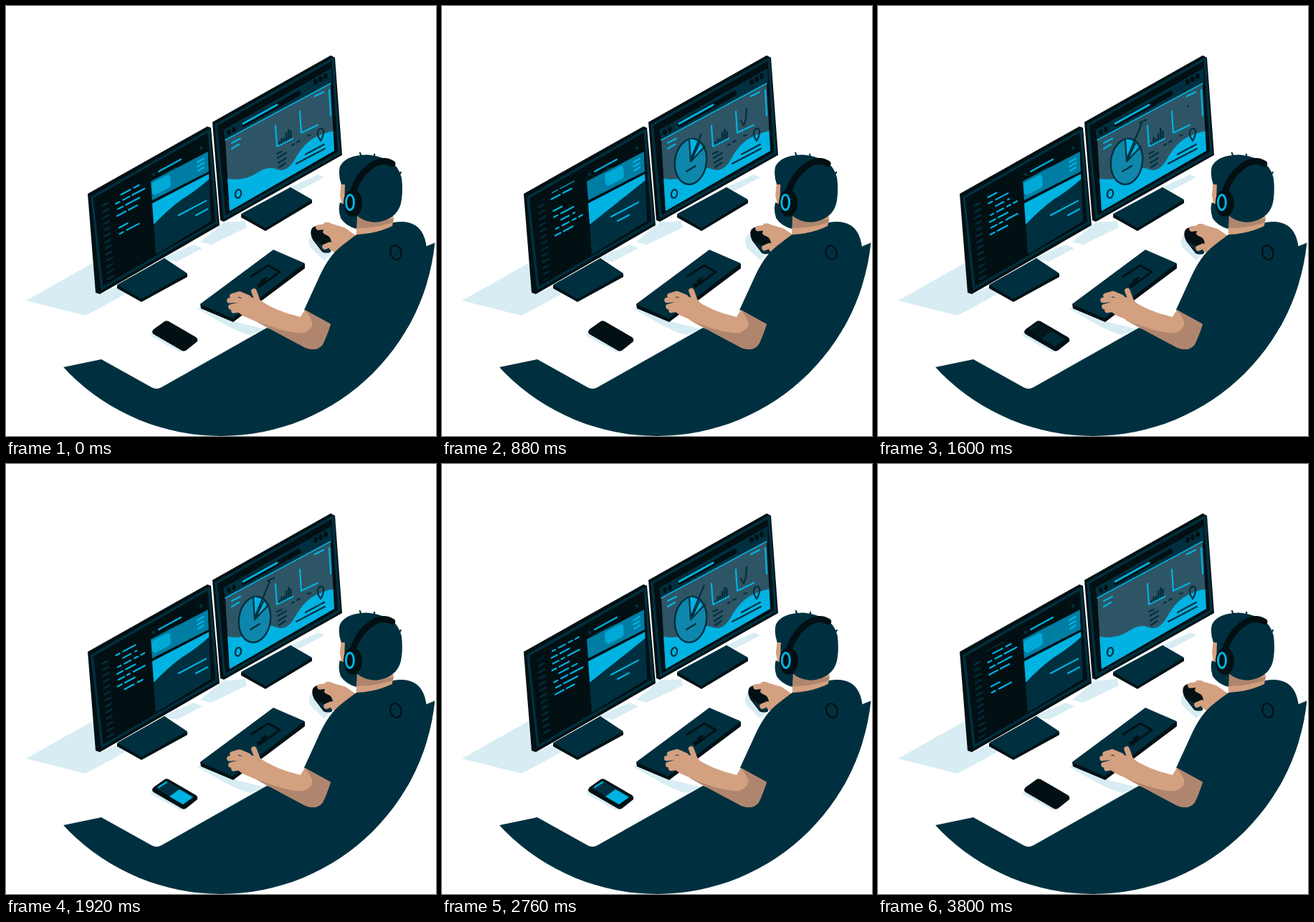
Recreate the animation shown at these times as an HTML page. Size 600 by 600 pixels, loop 3840 ms.

```html
<!DOCTYPE html>
<html lang="en">
<head>
<meta charset="utf-8">
<title>Desk loop</title>
<style>
html, body { margin: 0; width: 100%; height: 100%; overflow: hidden; background: #fff; }
svg { display: block; width: 100vw; height: 100vh; }
.ink { fill: #00303f; }
.black { fill: #021014; }
.blue { fill: #00b3e3; }
.pale { fill: #d7edf3; }
.skin { fill: #d3a080; }
.shade { fill: #af856d; }
.line { fill: none; stroke: #00b3e3; stroke-width: 2.2; stroke-linecap: round; stroke-linejoin: round; }
.dark { stroke: #00303f; }
.jet { stroke: #021014; }
.frame { stroke-width: 3.5; stroke-linejoin: miter; }
.finger { fill: none; stroke: #d3a080; stroke-width: 7.5; stroke-linecap: round; stroke-linejoin: round; }
</style>
</head>
<body>
<svg viewBox="0 0 600 600">
  <defs>
    <clipPath id="disc"><circle cx="300" cy="300" r="300" shape-rendering="crispEdges"/></clipPath>
    <clipPath id="page"><path d="M201 232L281 187L286 300L209 347Z"/></clipPath>
    <clipPath id="codeBox"><path d="M148 263L199 236L207 320L150 350Z"/></clipPath>
    <clipPath id="gutterBox"><path d="M132 274L147 266L155 375L140 385Z"/></clipPath>
    <clipPath id="dash"><path d="M306 187L453 108L458 202L312 286Z"/></clipPath>
  </defs>

  <g class="pale">
    <path d="M28 411L122 358L132 402L156 391L170 400L111 432Z"/>
    <path d="M218 352L262 333L274 338L238 357Z"/>
    <path d="M271 329L304 302L334 300L336 309L286 333Z"/>
    <path d="M394 254L436 235L444 239L404 260Z"/>
    <path d="M266 422L276 420L322 441L362 451L341 459Q326 456 305 444Z"/>
    <path d="M202 456L210 458L250 481L243 483L203 461Z"/>
    <path d="M427 318Q420 328 425 337L444 355L456 342Z"/>
  </g>

  <g id="stands">
    <path class="black" d="M155 390L221 352L253 374V378L189 413L155 394Z"/>
    <path class="ink" d="M155 389L221 352L253 373L189 409Z"/>
    <path class="black" d="M328 291L397 253L427 271V275L362 314L328 295Z"/>
    <path class="ink" d="M328 290L397 253L427 270L362 310Z"/>
  </g>

  <g id="left">
    <path class="black" d="M114 262L281 168L286 170L298 306L131 402L125 400Z"/>
    <path class="line dark frame" d="M120 267L283 174L294 302L134 394Z"/>
    <path class="black" d="M127 269L281 182L289 299L139 385Z"/>
    <g clip-path="url(#page)">
      <path class="ink" d="M200 225H290V350H200Z"/>
      <path class="black" d="M200 232L281 187V200L202 244Z"/>
      <path fill="#007da3" d="M202 245L282 203L283 231L204 271Z"/>
      <path id="slide" fill="#00a8d6" d="M207 245L225 236Q228 235 229 238L230 249Q230 252 227 254L209 263Q205 264 204 260L203 250Q203 247 207 245Z"/>
      <path class="black" d="M203 272L284 230.500V233L204 275Z"/>
      <path id="hill" class="blue"/>
      <g id="pageLines"></g>
    </g>
    <circle class="ink" cx="206" cy="235" r="2.4"/>
    <circle class="ink" cx="272" cy="198" r="2.4"/>
    <path class="line" d="M213 231L244 214"/>
    <path class="line" d="M267 218L276 213M267 224L276 219M268 230L276 225"/>
    <g clip-path="url(#gutterBox)"><g id="gutter"></g></g>
    <g clip-path="url(#codeBox)"><g id="code"></g></g>
  </g>

  <g id="right">
    <path class="black" d="M288 162L453 69L459 72L469 208L304 301L299 299Z"/>
    <path class="line dark frame" d="M293 166L456 74L465 205L305 295Z"/>
    <path class="ink" d="M303 173L454 87L455 106L306 186Z"/>
    <path class="line jet" style="stroke-width:7" d="M332 165L408 122"/>
    <path class="line" style="stroke-width:3" d="M331 164L378 138"/>
    <g class="black">
      <ellipse cx="311" cy="176" rx="2.6" ry="4"/><ellipse cx="318" cy="172.5" rx="2.6" ry="4"/>
      <ellipse cx="432" cy="106" rx="3" ry="4"/><ellipse cx="439" cy="102" rx="3" ry="4"/><ellipse cx="446" cy="98" rx="3" ry="4"/>
    </g>
    <g clip-path="url(#dash)">
      <path fill="#2e5565" d="M300 100H460V290H300Z"/>
      <path class="blue" d="M305 240Q330 246 350 233Q366 222 378 228Q392 233 403 214Q416 190 434 182Q446 176 460 174V290H305Z"/>
    </g>
    <path class="line" style="stroke-width:1.6" d="M306 187L453 108"/>
    <path class="line" d="M315 191L327 185M315 199L325 193M431 126L443 120M451 117L453 153"/>
    <path class="line" d="M376 167L378 196L400 185M410 147L412 177L435 166"/>
    <path class="line dark" d="M378 206L385 203M379 212L391 205M380 219L391 212M381 225L390 219M399 194L402 193M406 190L410 188M421 181L425 180M418 207L444 193M405 220L445 199"/>
    <path class="line dark" d="M439 188Q434 181 435 176Q437 170 441 171Q444 173 443 178Q442 184 439 188Z"/>
    <ellipse class="line dark" cx="324" cy="262" rx="4" ry="6" transform="rotate(12 324 262)"/>
    <g id="bars" class="line dark" style="stroke-width:2.6;stroke-linecap:butt"></g>
    <path id="graph" class="line dark" pathLength="100" d="M417 160L421 167L424 158L425 143Q428 139 429 146Q431 149 433 139"/>
    <g id="pie">
      <ellipse cx="347" cy="217" rx="22" ry="32" transform="rotate(8 347 217)" fill="#0f86ab" stroke="#00303f" stroke-width="2.4"/>
      <path class="blue" d="M347 217L345 186Q355 184 363 197Z"/>
      <path class="line dark" d="M345 186L347 217L367 196M347 217L359 192M341 231L354 223"/>
    </g>
    <path id="callout" class="line dark" pathLength="100" d="M347 214L368 164L365 163L374 159"/>
  </g>

  <g id="keyboard">
    <path class="black" d="M271 416L373 341L417 360V366L317 441L272 422Z"/>
    <path class="ink" d="M271 416L373 340L417 359L316 436Z"/>
    <path class="line jet" style="stroke-width:2.8;stroke-linecap:butt" d="M341 378L366 362L382 371L352 393M356 384L364 379M350 390L364 383"/>
  </g>

  <g id="phone">
    <path class="black" d="M206 451L220 441Q223 438 227 440L265 462Q268 464 267 468L252 480Q248 483 244 480L206 458Q202 455 206 451Z"/>
    <g id="lit">
      <path class="ink" d="M209 452L224 442L262 464L247 475Z"/>
      <path class="blue" d="M228 464L242 454L261 465L247 475Z"/>
      <path class="line" d="M213 451L224 444"/>
    </g>
  </g>

  <g id="mouse">
    <path class="black" d="M428 311Q434 305 442 311L456 326L454 344Q448 347 442 344L429 327Q424 317 428 311Z"/>
    <path class="ink" d="M430 325Q438 336 455 335L453 345Q447 346 442 342Z"/>
    <path class="skin" d="M444 304Q449 301 456 305L473 310L489 321L462 347L452 340L455 331Q455 325 449 320Z"/>
    <path class="finger" d="M454 311L445 309L437 310M455 320L447 316M461 337L453 334L446 337"/>
  </g>

  <g clip-path="url(#disc)">
    <path class="ink" d="M80 504L133 493L203 532Q210 536 217 532L364 449L420 465L453 443L500 420L587 335L604 328V604H80Z"/>
    <g id="torso">
      <path class="ink" d="M416 424L438 376Q451 348 468 335Q478 327 489 319L541 302Q559 299 571 306Q584 314 587 337L587 450L453 444Z"/>
      <ellipse class="line jet" cx="544" cy="344" rx="7.5" ry="10" transform="rotate(-18 544 344)"/>
    </g>
    <path class="skin" d="M352 409Q376 426 411 434L417 424L453 444Q447 462 442 472Q434 483 418 477L345 438Z"/>
    <path class="shade" d="M417 424L453 444Q447 462 442 472Q434 483 418 477L347 439Q398 459 416 456Q430 449 427 440Q423 431 417 424Z"/>
  </g>

  <g id="hand">
    <path class="skin" d="M332 401Q340 406 356 411L362 424L351 441L330 432L321 425Z"/>
    <path class="finger" d="M338 407L326 402L316 405M334 413L321 410L312 411M332 419L322 418L314 420M336 426L324 424L318 425M352 414L346 398"/>
  </g>

  <g id="head">
    <path class="skin" d="M468 244L466 264L470 284L489 297V319Q516 318 539 307L541 295L520 260L478 235Z"/>
    <path class="shade" d="M488 294L515 300L541 297L540 302Q516 310 489 310Z"/>
    <path class="ink" d="M468 249Q463 235 466 224Q473 210 496 208Q512 206 530 214Q547 220 552 240Q554 255 552 270Q549 295 522 301Q505 304 490 293L489 311Q474 307 467 296Q463 284 466 274L472 277L473 249Z"/>
    <path class="line dark" d="M500 211Q495 210 494 205M513 212Q515 210 514 207M544 236Q549 236 551 232"/>
    <path class="line jet" style="stroke-width:9" d="M539 220Q526 212 511 222Q488 238 482 268"/>
    <ellipse class="black" cx="484" cy="275" rx="13" ry="19"/>
    <ellipse class="line" cx="480" cy="274" rx="5.5" ry="10.5" style="stroke-width:3"/>
  </g>
</svg>

<script>
const LOOP = 3840, HALF = LOOP / 2, ROW = 8.5, ROW_MS = 320;
const $ = id => document.getElementById(id);
const clamp = x => Math.max(0, Math.min(1, x));
const smooth = x => (x = clamp(x), x * x * (3 - 2 * x));

function add(parent, cls) {
  const el = document.createElementNS('http://www.w3.org/2000/svg', 'path');
  el.setAttribute('class', cls);
  parent.append(el);
  return el;
}

// Eased value from [time, value] steps.
function track(steps, t) {
  const i = steps.findIndex(s => s[0] > t);
  if (i < 0) return steps[steps.length - 1][1];
  if (!i) return steps[0][1];
  const [a, from] = steps[i - 1], [b, to] = steps[i];
  return from + (to - from) * smooth((t - a) / (b - a));
}

// Each row lists the start and end of its dashes.
const rows = [
  [2, 7, 12, 29], [11, 22, 28, 30], [3, 7, 12, 21, 26, 31, 35, 40],
  [1, 9, 13, 26], [2, 10, 14, 18, 23, 39], [0, 6, 10, 24],
  [9, 22, 27, 34], [1, 6, 11, 20, 24, 41], [3, 10, 14, 33],
  [1, 13, 17, 29], [], [2, 14]
];
const code = rows.map(() => add($('code'), 'line'));
const ticks = Array.from({ length: 15 }, () => add($('gutter'), 'line dark'));
const bars = Array.from({ length: 6 }, () => add($('bars'), ''));
const pageLines = [0, 1].map(() => add($('pageLines'), 'line'));

const slant = (x, y, from, to, k = .53) =>
  `M${x + from} ${y - k * from}L${x + to} ${y - k * to}`;

function drawCode(t) {
  const p = t / ROW_MS;
  rows.forEach((row, k) => {
    const n = k + 12 * Math.floor((p + .9 - k) / 12);
    const v = 46 - ROW * (p - n);
    const typed = clamp((p - n + .9) / .8) * 42;
    let d = '';
    for (let i = 0; i < row.length; i += 2)
      if (typed > row[i]) d += slant(152 + v * .1, 273 + v, row[i], Math.min(row[i + 1], typed));
    code[k].setAttribute('d', v > -14 ? d : '');
  });
  ticks.forEach((el, i) => {
    const v = (i - p % 1) * ROW;
    el.setAttribute('d', slant(134 + v * .08, 279 + v, 0, 8));
  });
}

function drawPage(h) {
  const s = track([[100, 0], [560, 1], [1290, 1], [1480, 0]], h);
  $('slide').setAttribute('transform', `translate(${24 * s} ${-12.5 * s})`);
  $('hill').setAttribute('d', `M203 276L284 234V${241 + 2 * s}Q${265 - s} ${258 + s} 245 ${270 + 4 * s}Q226 ${284 + 5 * s} 206 305Z`);
  const spans = [[241 - 5 * s, 292 + 2 * s, 38], [265 - 20 * s, 292 + 8 * s, 16]];
  spans.forEach(([x, y, w], i) => pageLines[i].setAttribute('d', slant(x, y, 0, w)));
}

function stroke(el, from, to) {
  const len = Math.max(0, to - from);
  el.style.strokeDasharray = `${len} 300`;
  el.style.strokeDashoffset = -from;
  el.style.visibility = len > .5 ? 'visible' : 'hidden';
}

function drawCharts(t, h) {
  stroke($('graph'),
    track([[880, 0], [1280, 58], [1480, 84], [1640, 100]], h),
    track([[360, 0], [840, 64], [1200, 100]], h));

  bars.forEach((el, i) => {
    const base = [4, 7, 6, 12, 15, 11][i];
    const wave = Math.sin(2 * Math.PI * t / HALF) * Math.sin(i * 2 + t / HALF * Math.PI);
    const x = 381.5 + 3.2 * i, y = 193.5 - 1.7 * i;
    el.setAttribute('d', `M${x} ${y}v${-base - 2.5 * wave}`);
  });

  const size = track([[160, 0], [640, 1], [3280, 1], [3520, 0]], t);
  $('pie').setAttribute('transform', `translate(347 217) scale(${size}) translate(-347 -217)`);
  $('pie').style.visibility = size > .01 ? 'visible' : 'hidden';
  stroke($('callout'), 0,
    track([[600, 0], [1120, 100], [2360, 100], [2760, 72], [3120, 0]], t));
}

function drawPerson(t) {
  const mx = track([[200, -1], [800, 4], [960, 4], [1200, 1], [2880, 1], [3320, -1]], t);
  const my = track([[200, -1], [1200, 1], [2880, 1], [3320, -1]], t);
  $('mouse').setAttribute('transform', `translate(${mx} ${my})`);
  const sway = -.8 * track([[200, 0], [800, 1], [960, 1], [1200, .2], [2880, .2], [3320, 0]], t);
  $('torso').setAttribute('transform', `translate(${sway} 0)`);
  $('head').setAttribute('transform', `translate(${sway} 0)`);
  const tap = .5 - .5 * Math.cos(2 * Math.PI * (t / 240 - .12));
  $('hand').setAttribute('transform', `translate(${2.4 * tap - .4} ${-.6 * tap})`);
}

function draw(t) {
  const h = t % HALF;
  drawCode(t);
  drawPage(h);
  drawCharts(t, h);
  drawPerson(t);
  $('lit').style.opacity = track([[1560, 0], [1720, 1], [3520, 1], [3680, 0]], t);
}

const start = performance.now();
function frame() {
  draw((performance.now() - start) % LOOP);
  requestAnimationFrame(frame);
}
frame();
</script>
</body>
</html>
```
